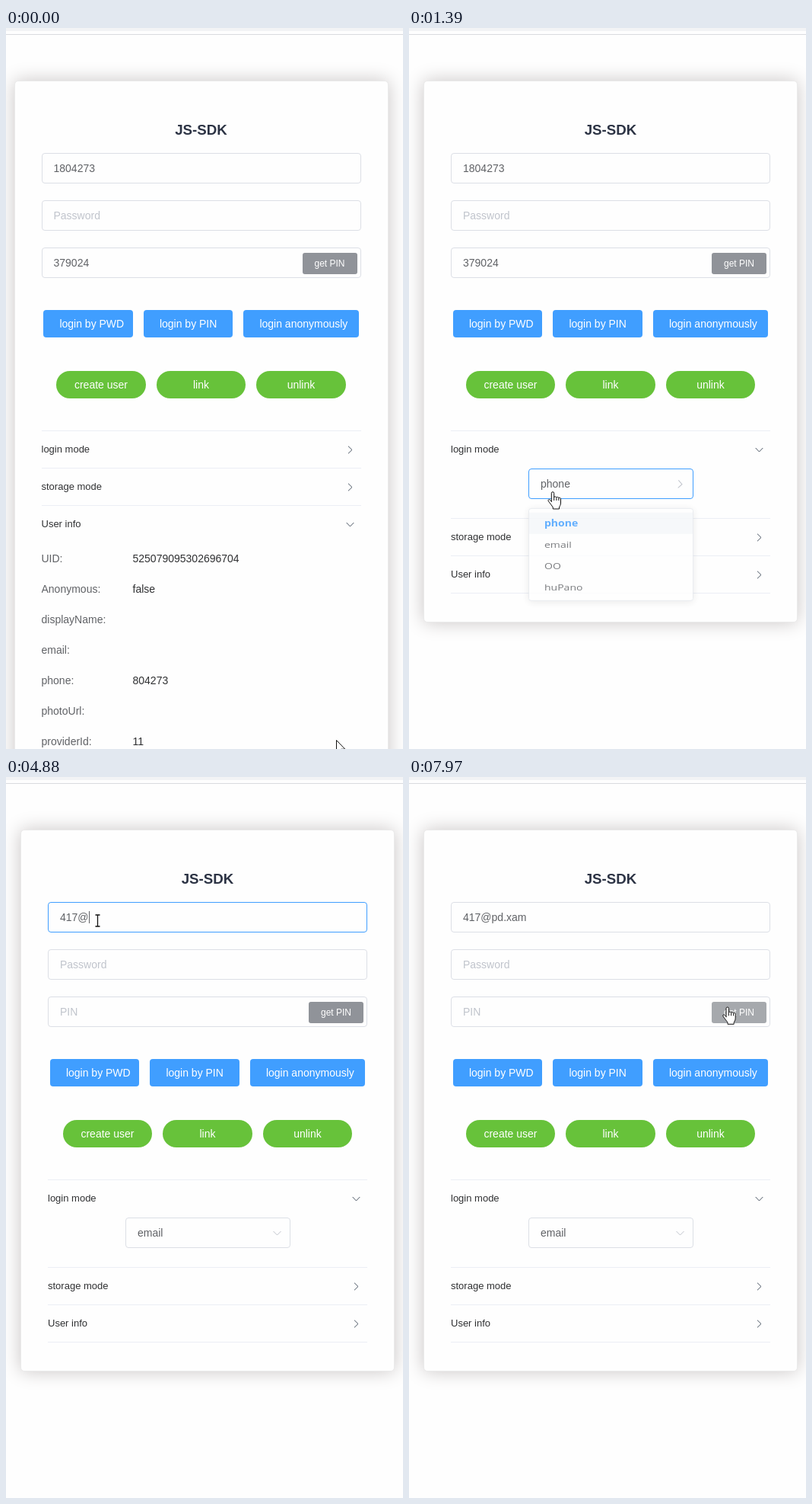
Animation of 522x946 px, one loop 8000 ms. Source, as an HTML page:

```html
<!DOCTYPE html>
<html lang="en">
<head>
<meta charset="utf-8">
<title>JS-SDK login form</title>
<style>
  html, body { margin: 0; width: 522px; height: 946px; overflow: hidden; background: #fefefe; }
  body { position: relative; font: 14px "Liberation Sans", Arial, sans-serif; color: #606266; }
  #bar { position: absolute; top: 0; width: 522px; height: 4px; background: #f2f3f5; }
  #rule { position: absolute; top: 8px; width: 522px; height: 1px; background: #d9dade; }
  #page, #page > * { position: absolute; }
  #page { top: 0; left: 0; width: 522px; }
  #page > * { box-sizing: border-box; white-space: nowrap; }
  #page > .card { box-sizing: content-box; left: 19px; top: 69px; width: 420px; padding: 458px 35px 37px;
    border: 1px solid #eaeaea; border-radius: 5px; background: #fefefe; box-shadow: 0 0 25px #cac6c6; }
  h3 { left: 20px; top: 123px; width: 490px; margin: 0; font-size: 18.72px; line-height: 22px;
    text-align: center; color: #2c3344; }
  .field { display: flex; align-items: center; height: 40px; padding-left: 15px;
    border: 1px solid #dcdfe6; border-radius: 4px; background: #fefefe; }
  .field i { width: 1px; height: 16px; margin-right: -1px; background: #606266; }
  .field .hint { color: #c0c4cc; }
  .btn { height: 36px; line-height: 36px; border-radius: 4px; background: #409eff; color: #fff; padding-left: 21px; }
  .round { border-radius: 20px; background: #67c23a; padding: 0; text-align: center; }
  #pin { left: 398px; top: 295px; width: 72px; height: 28px; padding-left: 16px; line-height: 28px;
    font-size: 12px; border-radius: 3px; }
  #fold { border-top: 1px solid #ebeef5; }
  .head { position: relative; height: 48px; line-height: 47px; font-size: 13px; color: #303133;
    border-bottom: 1px solid #ebeef5; }
  .head svg { position: absolute; right: 8px; top: 18px; }
  svg { display: block; overflow: visible; fill: none; }
  .wrap { position: relative; overflow: hidden; border-bottom: 1px solid #ebeef5; }
  #select { position: absolute; box-sizing: border-box; left: 102px; top: 0; width: 217px; }
  #select svg { position: absolute; right: 10px; top: 13px; }
  .row { height: 40px; line-height: 40px; }
  .row span { display: inline-block; width: 120px; }
  .row b { font-weight: normal; color: #303133; }
  #drop { left: 157px; top: 630px; width: 217px; height: 148px; padding: 6px 0; border: 1px solid #e4e7ed;
    border-radius: 4px; background: #fefefe; box-shadow: 0 2px 12px rgba(0,0,0,.1);
    transform-origin: center top; font-family: "Open Sans", "Noto Sans", sans-serif; }
  #drop div { height: 34px; line-height: 34px; padding-left: 20px; }
  #cursor { position: absolute; left: 0; top: 0; }
</style>
</head>
<body>
<div id="bar"></div><div id="rule"></div>
<div id="page">
  <div class="card"><div id="fold"></div></div>
  <h3>JS-SDK</h3>
  <div id="drop"></div>
</div>
<svg id="cursor" width="1" height="1"><path id="shape"/></svg>
<script>
const $ = id => document.getElementById(id);
const page = $('page'), fold = $('fold'), drop = $('drop');

function add(parent, cls, html, style) {
  const el = document.createElement('div');
  el.className = cls;
  el.innerHTML = html;
  Object.assign(el.style, style);
  parent.appendChild(el);
  return el;
}
const chevron = (color, d) =>
  `<svg width="13" height="13" viewBox="-6.5 -6.5 13 13"><path d="${d}" stroke="${color}"/></svg>`;

// Form
const fields = [164, 226, 288].map(top => add(page, 'field',
  '<span></span><i></i><span class="hint"></span>', { left: '55px', top: top + 'px', width: '420px' }));
const hints = ['Account', 'Password', 'PIN'];
const pin = add(page, 'btn', 'get PIN');
pin.id = 'pin';
[['login by PWD', 57.9, 117.6], ['login by PIN', 189.4, 117.6], ['login anonymously', 320.9, 151.2]]
  .forEach(([s, x, w]) => add(page, 'btn', s, { left: x + 'px', top: '370px', width: w + 'px' }));
['create user', 'link', 'unlink'].forEach((s, i) =>
  add(page, 'btn round', s, { left: 74.7 + i * 131.5 + 'px', top: '450px', width: '117.6px' }));

// Accordion
const right = 'M-2.5 -4.8L2.5 0L-2.5 4.8';
const section = s => add(fold, 'head', s + chevron('#4a5563', right));
const loginHead = section('login mode');
const loginWrap = add(fold, 'wrap', '<div id="select" class="field"><span></span>' +
  chevron('#c0c4cc', 'M-5 -2.5L0 2.5L5 -2.5') + '</div>');
section('storage mode');
const userHead = section('User info');
const userWrap = add(fold, 'wrap', '');
[['UID', '525079095302696704'], ['Anonymous', 'false'], ['displayName', ''], ['email', ''],
 ['phone', '804273'], ['photoUrl', ''], ['providerId', '11']].forEach(([k, v]) =>
  add(userWrap, 'row', `<span>${k}:</span><b>${v}</b>`));
const select = $('select');
const options = ['phone', 'email', 'OO', 'huPano'].map(s => add(drop, '', s));
page.appendChild(drop);

// Timing
function bezier(x1, y1, x2, y2) {
  const f = (a, b, s) => 3 * (1 - s) * (1 - s) * s * a + 3 * (1 - s) * s * s * b + s * s * s;
  return x => {
    if (x <= 0) return 0;
    if (x >= 1) return 1;
    let lo = 0, hi = 1;
    for (let i = 0; i < 24; i++) {
      const m = (lo + hi) / 2;
      if (f(x1, x2, m) < x) lo = m; else hi = m;
    }
    return f(y1, y2, lo);
  };
}
const ease = bezier(.25, .1, .25, 1);
const easeInOut = bezier(.42, 0, .58, 1);
const zoom = bezier(.23, 1, .32, 1);

const bursts = [[70, 380, 5], [530, 990, 7], [1250, 1390, 3], [1470, 2010, 8], [2080, 2700, 9], [7280, 7970, 10]];
function snap(t) {
  let r = 0;
  for (const [a, b, n] of bursts) {
    if (t < a) break;
    const step = (b - a) / (n - 1);
    r = a + step * Math.min(n - 1, Math.floor((t - a) / step + .01));
  }
  return r;
}

const route = [[0, 434, 934], [150, 330, 760], [300, 165, 552], [380, 149, 534], [530, 150, 537],
  [610, 158, 553], [760, 182, 581], [990, 189, 608], [1390, 189, 608], [1550, 195, 640], [1700, 203, 678],
  [2010, 206, 689], [2080, 206, 689], [2240, 190, 580], [2390, 150, 350], [2550, 123, 200],
  [2620, 120.5, 188.5], [7200, 120.5, 188.5], [7360, 215, 204], [7510, 387.5, 258], [7660, 408, 288],
  [7820, 417, 298], [7890, 418.7, 301.3], [8000, 418.7, 301.3]];
function pointer(t) {
  const i = Math.max(1, route.findIndex(k => k[0] >= t));
  const [a, x0, y0] = route[i - 1], [b, x1, y1] = route[i];
  const p = (t - a) / (b - a);
  return [x0 + (x1 - x0) * p, y0 + (y1 - y0) * p];
}

const mail = '417@pd.xam';
const keys = [3310, 3385, 3460, 4880, 5260, 5410, 6120, 6270, 6350, 6500];
const caretOff = [[3080, 3310], [4010, 4560], [5890, 6120], [7050, 7590]];

const shapes = {
  arrow: ['M.5 .5V16.5L4.2 13 6.8 18.8 9 17.8 6.5 12.2H11.8Z', 0, 0, '#fff'],
  hand: ['M5 14V2.4a1.7 1.7 0 0 1 3.4 0V8c0-1.6 3.2-1.5 3.2.3 .3-1.4 3-1.2 3 .6 .3-1.2 2.6-1 2.6 1V15' +
    'c0 3-1.5 4.5-2 6v2H7v-2C5.5 18.5 3 15.5 1 12.8 0 11 2 9.8 3.3 11.2L5 13.2M8.4 8v4M11.6 8.5v3.5M14.6 9v3',
    6.7, 0, '#fff'],
  beam: ['M-3 -7.5H3M-3 7.5H3M0 -7.5V7.5', 0, 0, 'none']
};
function cursorKind(x, y, open, onPin) {
  const within = (a, b) => y >= a && y <= b;
  if (onPin || open || within(529, 676) || within(370, 406) || within(450, 486)) return 'hand';
  return within(164, 204) || within(226, 266) || within(288, 328) ? 'beam' : 'arrow';
}

function setField(i, value, caret, border) {
  const [text, bar, hint] = fields[i].children;
  text.textContent = value;
  bar.style.display = caret ? '' : 'none';
  hint.textContent = value ? '' : hints[i];
  fields[i].style.borderColor = border;
}

function draw(now) {
  const t = now % 8000, s = snap(t);
  const [x, y] = pointer(s);
  page.style.left = s < 835 ? '-8.5px' : '0';

  // Sections swap
  const u = (s - 595) / 300, grow = easeInOut(u), turn = ease(u);
  loginWrap.style.display = grow > 0 ? '' : 'none';
  loginWrap.style.height = 65 * grow + 'px';
  userWrap.style.display = grow < 1 ? '' : 'none';
  userWrap.style.height = 505 * (1 - grow) + 'px';
  loginHead.style.borderBottomColor = `rgba(235,238,245,${1 - turn})`;
  userHead.style.borderBottomColor = `rgba(235,238,245,${turn})`;
  loginHead.lastChild.style.transform = `rotate(${90 * turn}deg)`;
  userHead.lastChild.style.transform = `rotate(${90 - 90 * turn}deg)`;

  // Dropdown
  const chosen = s >= 2080;
  const fade = k => k((s - 1305) / 300) - k((s - 2060) / 300);
  const open = fade(zoom);
  drop.style.display = open > 0 ? '' : 'none';
  drop.style.opacity = open;
  drop.style.transform = `scaleY(${open})`;
  options.forEach((o, i) => {
    const picked = i === (chosen ? 1 : 0);
    o.style.color = picked ? '#409eff' : '';
    o.style.fontWeight = picked ? 700 : 400;
    o.style.background = i === (y > 671 ? 1 : 0) ? '#f5f7fa' : '';
  });
  select.firstChild.textContent = chosen ? 'email' : 'phone';
  select.lastChild.style.transform = `rotate(${-180 * fade(ease)}deg)`;
  select.style.borderColor = s >= 1250 && s < 2545 ? '#409eff' : '#dcdfe6';

  // Inputs
  const focus = s >= 2545 && s < 7885;
  const caret = focus && !caretOff.some(([a, b]) => t >= a && t < b);
  const typed = mail.slice(0, keys.filter(k => t >= k).length);
  const onPin = x > 398 && x < 470 && y > 295 && y < 323;
  const hover = (a, b) => !onPin && y >= a && y <= b ? '#c0c4cc' : '#dcdfe6';
  setField(0, chosen ? typed : '1804273', caret, focus ? '#409eff' : '#dcdfe6');
  setField(1, '', false, hover(226, 266));
  setField(2, chosen ? '' : '379024', false, hover(288, 328));
  pin.style.background = onPin ? '#a6a9ad' : '#909399';

  const [d, dx, dy, fill] = shapes[cursorKind(x, y, open > .3, onPin)];
  const shape = $('shape');
  shape.setAttribute('d', d);
  shape.setAttribute('fill', fill);
  shape.setAttribute('stroke', '#111');
  shape.setAttribute('stroke-width', fill === 'none' ? 1.3 : 1);
  shape.setAttribute('transform', `translate(${x - dx} ${y - dy})`);
}

const start = performance.now();
function tick() {
  draw(performance.now() - start);
  requestAnimationFrame(tick);
}
tick();
</script>
</body>
</html>
```
